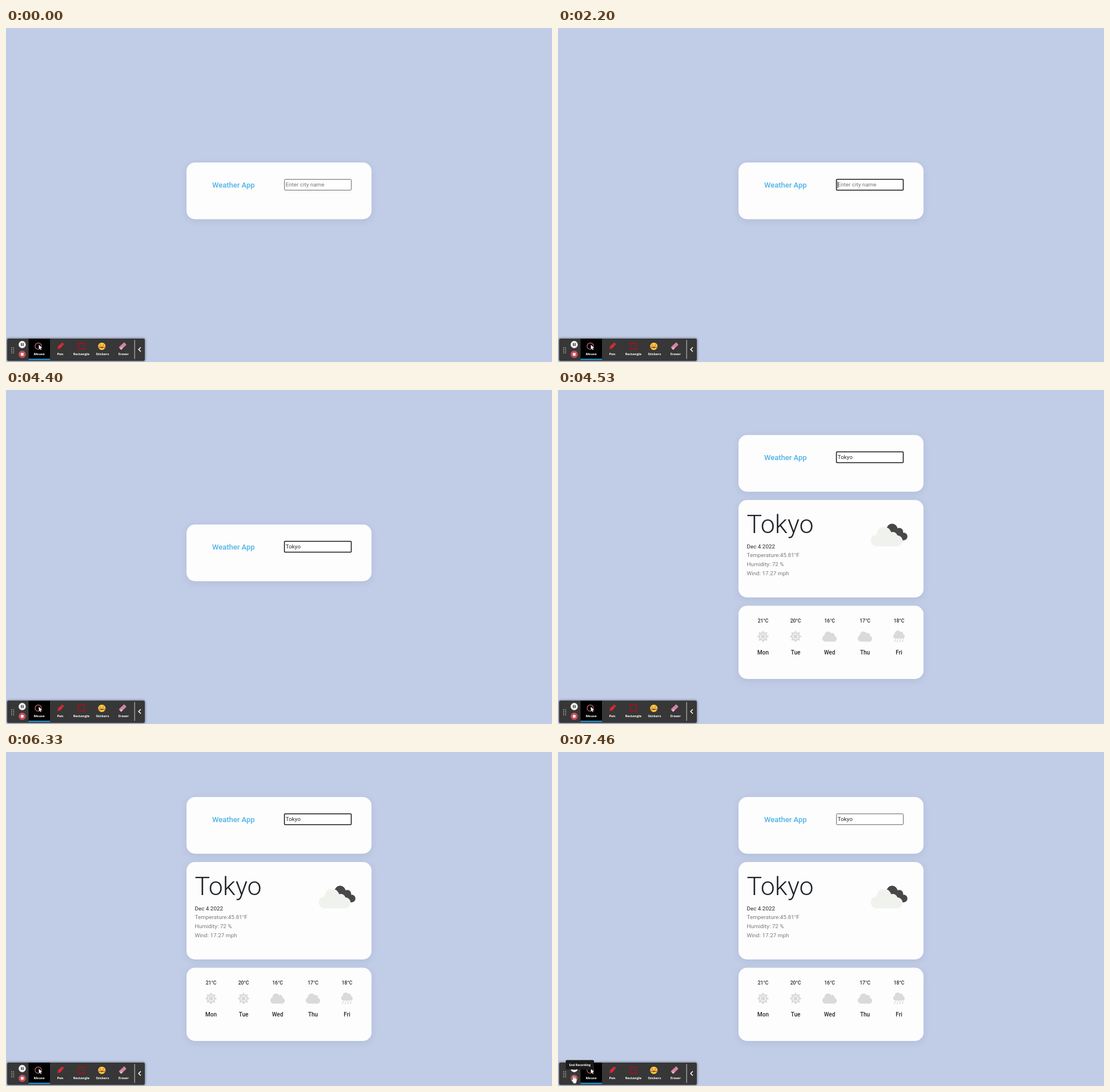
Animation, 956 px wide and 586 px high, one loop 7530 ms. Source, as an HTML page:

```html
<!DOCTYPE html>
<html lang="en">
<head>
<meta charset="utf-8">
<title>Weather App</title>
<style>
  html, body { margin: 0; width: 100%; height: 100%; overflow: hidden; background: #c1cde7; }
  svg { display: block; width: 956px; height: 586px; font: 9.9px Roboto, Arial, sans-serif; }
  .card { fill: #fdfdfd; filter: drop-shadow(0 3px 6px rgba(20, 30, 60, .09)); }
  .title { font-size: 13px; font-weight: 500; fill: #4fb3e6; }
  .city { font-size: 44.6px; font-weight: 300; fill: #212529; }
  .info { fill: #7b7b7b; }
  .temp { font-size: 8.6px; font-weight: 500; }
  .day { font-size: 10px; font-weight: 500; }
  .mid { text-anchor: middle; }
  .dark { fill: #25282c; }
  .bar { font: 700 5.8px "Open Sans", Arial, sans-serif; fill: #fff; text-anchor: middle; }
  .tip { font-size: 5.3px; }
</style>
</head>
<body>
<svg viewBox="0 0 956 586">
  <defs>
    <path id="cloud" d="M538 227c4-11 6-22 6-35 0-53-43-96-96-96-20 0-38 6-53 16C367 64 315 32 256 32c-88 0-160 72-160 160v8C40 220 0 273 0 336c0 80 64 144 144 144h368c71 0 128-57 128-128 0-62-44-114-102-125z"/>
    <g id="sun">
      <path id="rays" stroke="#dadada" stroke-width="1.4" stroke-linejoin="round"/>
      <circle r="4.5" fill="none" stroke="#fdfdfd" stroke-width="1.3"/>
    </g>
  </defs>

  <g id="search">
    <rect class="card" x="316" y="236" width="324" height="99.5" rx="15"/>
    <text class="title" x="361" y="280.2">Weather App</text>
    <rect id="field" x="487.5" y="265.5" width="117" height="19" rx="1.2" fill="#fff"/>
    <text id="entry" x="489.5" y="278.4"></text>
    <path id="caret" stroke="#222" d="M0 269.5v11.5"/>
  </g>

  <g id="result">
    <rect class="card" x="316" y="193" width="324" height="171" rx="15"/>
    <text class="city" x="330.4" y="250.7">Tokyo</text>
    <text class="dark" x="330.5" y="277.5">Dec 4 2022</text>
    <g class="info">
      <text x="330.5" y="293">Temperature:45.81°F</text>
      <text x="330.5" y="309">Humidity: 72 %</text>
      <text x="330.5" y="325">Wind: 17.27 mph</text>
    </g>
    <g fill="#48484a">
      <circle cx="585" cy="244.2" r="9.6"/>
      <circle cx="597.6" cy="248.8" r="6.8"/>
      <circle cx="605" cy="257" r="6.8"/>
      <path d="M585 248h12l8 15.8h-20z"/>
    </g>
    <g fill="#f0f2ee">
      <circle cx="571" cy="253" r="12.7"/>
      <circle cx="586" cy="257.5" r="8.5"/>
      <circle cx="558" cy="264" r="10.3"/>
      <circle cx="594" cy="264.7" r="9.6"/>
      <path d="M558 256h30l6 18.3h-36z"/>
    </g>
    <rect class="card" x="316" y="378.5" width="324" height="128.5" rx="15"/>
    <g id="days"></g>
  </g>

  <g id="toolbar">
    <rect x="2" y="545" width="241" height="39" rx="2" fill="#373737" style="filter:drop-shadow(0 0 2px rgba(0,0,0,.6))"/>
    <path d="M9.9 560.3v10.4M13.3 560.3v10.4" stroke="#b5b5b5" stroke-width="1.5" stroke-dasharray="1.5 1.47"/>
    <circle cx="28.4" cy="555.4" r="6.3" fill="#f4f4f4"/>
    <path d="M27 552.8v5.2M29.9 552.8v5.2" stroke="#222" stroke-width="1.4"/>
    <circle cx="28.4" cy="572.5" r="6.3" fill="#c94f5b"/>
    <rect x="26" y="570.1" width="4.8" height="4.8" rx=".8" fill="#fbe9ea"/>
    <path d="M39.5 545H77v36H39.5z" fill="#000"/>
    <path d="M39.5 581.2H77" stroke="#2d9fdc" stroke-width="2"/>
    <circle cx="56.5" cy="558.2" r="5.6" fill="none" stroke="#d9747c" stroke-width="1.1"/>
    <path d="M57.3 555.2v9l2-1.8 1.4 2.9 1.6-.8-1.4-2.8h2.8z" fill="#fff" stroke="#000" stroke-width=".4"/>
    <g transform="translate(95 558.3) rotate(45)" fill="#e02a35">
      <path d="M-2.2-7.2h4.4v3.2h-4.4z"/>
      <path d="M-2.5-3.5h5V3L0 7.6l-2.5-4.6z"/>
      <path d="M0 2v5" stroke="#7d1118" stroke-width=".7"/>
    </g>
    <rect x="126.5" y="553" width="10.8" height="10.5" fill="none" stroke="#b20d1c" stroke-width="1.5"/>
    <circle cx="167.8" cy="558.4" r="6.5" fill="#f8cb42"/>
    <path d="M164.8 559.2h6a3 2.4 0 0 1-6 0z" fill="#8c3a1c"/>
    <path d="M163.8 557q1.3-2.1 2.6 0M169.2 557q1.3-2.1 2.6 0" fill="none" stroke="#70441a" stroke-width=".9"/>
    <circle cx="163.2" cy="560.3" r="1.6" fill="#ee6a48"/>
    <circle cx="172.4" cy="560.3" r="1.6" fill="#ee6a48"/>
    <g transform="translate(204.2 558) rotate(-43)">
      <rect x="-6.5" y="-3" width="13" height="6" rx="1" fill="#d583a8"/>
      <path d="M-6.5 0h4v3h-3q-1 0-1-1z" fill="#efb9cf"/>
    </g>
    <path d="M225.2 547.5v33" stroke="#d0d0d0"/>
    <path d="M236 560.2l-3.7 3.8 3.7 3.8" fill="none" stroke="#fff" stroke-width="1.6"/>
    <g class="bar" id="labels"></g>
  </g>

  <g id="pointerTip" class="bar tip">
    <rect x="35.5" y="519.5" width="49.5" height="17" rx="2" fill="#1b1b1b"/>
    <text x="60" y="529.8">Mouse Pointer</text>
  </g>
  <g id="endTip" class="bar tip">
    <rect x="13.5" y="540.5" width="49.5" height="16.5" rx="2" fill="#1b1b1b"/>
    <text x="38.3" y="550.6">End Recording</text>
  </g>
  <path id="hand" fill="#fff" stroke="#333" stroke-width=".7" stroke-linejoin="round"
    d="M-2.6-5.5q1-1.3 2 0v4.2q1-1 2 .2 1-.8 1.9.3 1.2-.5 1.7.7v3.5q0 2-1.3 3.2v1.6h-5.2v-1.4l-3.4-4.6q-.2-1.4 1-1.3l1.3 1.2z"/>
</svg>

<script>
const $ = id => document.getElementById(id);
const LOOP = 7530, FOCUS = 900, RESULT = 4500, BLUR = 7330;
const KEYS = [3260, 3400, 3530, 3660, 3800];
const PATH = [[6600, 58, 550], [7000, 42, 574.5], [7180, 30, 573.5], [7460, 28, 573.5]];

$('rays').setAttribute('d', 'M' + Array.from({ length: 16 }, (_, i) => {
  const r = i % 2 ? 6.2 : 9.5, a = i * Math.PI / 8;
  return `${r * Math.cos(a)} ${r * Math.sin(a)}`;
}).join('L') + 'Z');

const sun = x => `<use href="#sun" x="${x}" y="432.4"/>`;
const cloud = (x, y = 432.6, s = .0395) =>
  `<use href="#cloud" transform="translate(${x} ${y}) scale(${s}) translate(-320 -256)"/>`;
const rain = x => cloud(x, 429.2, .0318) +
  [-7, -2.4, 2.2, 6.8].map(d => `<path d="M${x + d + 1} 437.8l-2 4.2" stroke="#dadada" stroke-width="1.5" stroke-linecap="round"/>`).join('');

$('days').innerHTML = [
  [359, 21, 'Mon', sun], [416, 20, 'Tue', sun],
  [475.5, 16, 'Wed', cloud], [537.5, 17, 'Thu', cloud],
  [597, 18, 'Fri', rain]
].map(([x, temp, day, icon]) => `
  <text class="temp mid dark" x="${x}" y="408">${temp}°C</text>
  <g fill="#dadada">${icon(x)}</g>
  <text class="day mid dark" x="${x}" y="463.5">${day}</text>`).join('');

$('labels').innerHTML = ['Mouse', 'Pen', 'Rectangle', 'Stickers', 'Eraser']
  .map((s, i) => `<text x="${58 + 36.95 * i}" y="574.4">${s}</text>`).join('');

const show = (id, on) => $(id).style.display = on ? '' : 'none';
const ramp = (t, a, b) => Math.min(1, Math.max(0, (t - a) / (b - a)));

function handAt(t) {
  const next = PATH.findIndex(p => p[0] > t);
  const i = next < 0 ? PATH.length - 1 : Math.max(1, next);
  const a = PATH[i - 1], b = PATH[i];
  const u = ramp(t, a[0], b[0]), e = u * u * (3 - 2 * u);
  return [1, 2].map(k => a[k] + (b[k] - a[k]) * e);
}

function draw(t) {
  const typed = KEYS.filter(k => t >= k), text = 'Tokyo'.slice(0, typed.length);
  const focused = t >= FOCUS && t < BLUR;
  const entry = $('entry'), field = $('field');

  $('search').setAttribute('transform', `translate(0 ${t >= RESULT ? -157 : 0})`);
  show('result', t >= RESULT);

  entry.textContent = text || 'Enter city name';
  entry.setAttribute('fill', text ? '#2a2a2a' : '#757575');
  field.setAttribute('stroke', focused ? '#141414' : '#686868');
  field.setAttribute('stroke-width', focused ? 1.5 : 1);

  const blinkFrom = typed.length ? typed[typed.length - 1] : FOCUS;
  show('caret', focused && (t - blinkFrom) % 1000 < 500);
  const end = text ? entry.getComputedTextLength() : 0;
  $('caret').setAttribute('transform', `translate(${490 + end} 0)`);

  $('pointerTip').style.opacity = t < 7130 ? .65 * ramp(t, 6840, 7000) + .35 * ramp(t, 7000, 7100) : 0;
  $('endTip').style.opacity = ramp(t, 7140, 7330);
  show('hand', t >= PATH[0][0]);
  $('hand').setAttribute('transform', `translate(${handAt(t)})`);
}

const start = performance.now();
function tick() {
  draw((performance.now() - start) % LOOP);
  requestAnimationFrame(tick);
}
tick();
</script>
</body>
</html>
```
